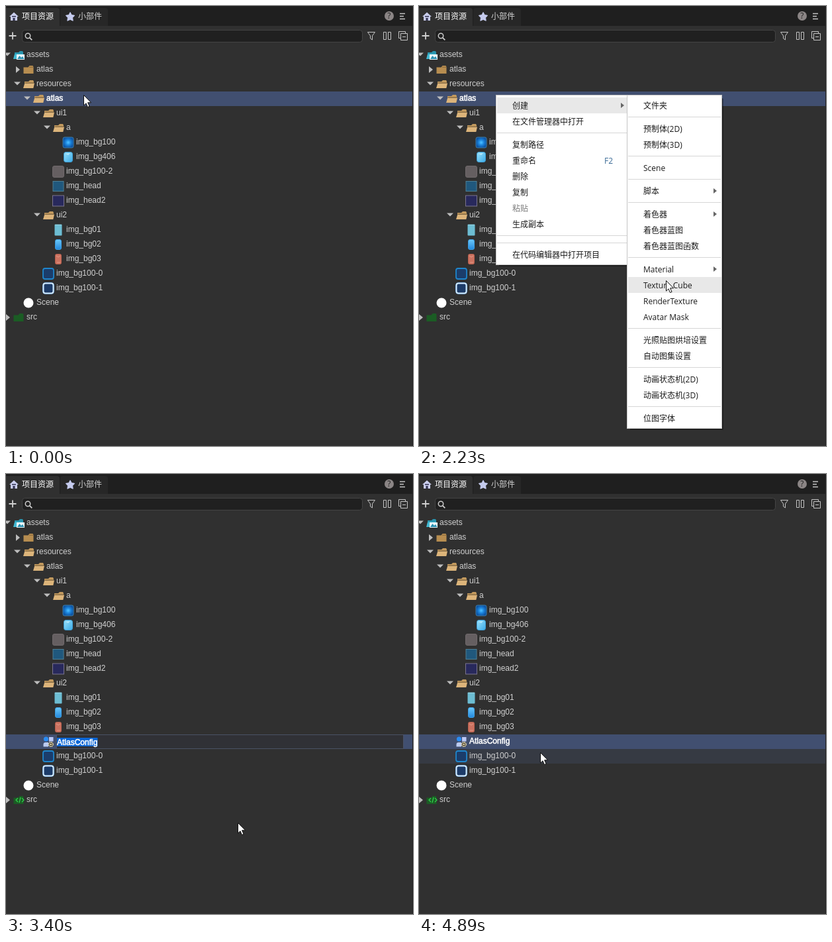
These frames come from a looping animation (615 by 664 pixels, 5.12 s). An HTML page:

```html
<!DOCTYPE html>
<html lang="zh-CN">
<head>
<meta charset="utf-8">
<title>Asset panel</title>
<style>
html, body { margin: 0; width: 100%; height: 100%; overflow: hidden; background: #303030; }
svg { display: block; width: 100%; height: 100%; }
text { font: 12px "Open Sans", "Noto Sans CJK SC", "Noto Sans CJK", sans-serif; white-space: pre; }
.tree text { font-family: "Liberation Sans", Arial, sans-serif; fill: #d0d0d0; }
.tree .on { fill: #fff; stroke: #fff; stroke-width: .55px; }
</style>
</head>
<body>
<svg id="stage" viewBox="0 0 615 664" xmlns="http://www.w3.org/2000/svg"></svg>
<script>
const LOOP = 5120, TOP = 63, ROW = 22, NEW_ROW = 15;

const rect = (x, y, w, h, fill, more = '') =>
  `<rect x="${x}" y="${y}" width="${w}" height="${h}" fill="${fill}" ${more}/>`;
const path = (d, fill, more = '') => `<path d="${d}" fill="${fill}" ${more}/>`;
const line = (d, color, w = 1) => path(d, 'none', `stroke="${color}" stroke-width="${w}"`);
const circle = (x, y, r, fill, more = '') => `<circle cx="${x}" cy="${y}" r="${r}" fill="${fill}" ${more}/>`;
const text = (x, y, s, fill, more = '') => `<text x="${x}" y="${y}" fill="${fill}" ${more}>${s}</text>`;
const group = (id, body, more = '') => `<g id="${id}" ${more}>${body}</g>`;
const tile = (w, h, fill, stroke, rx = 0, sw = 1) =>
  rect(-w / 2, -h / 2, w, h, fill, `rx="${rx}" stroke="${stroke}" stroke-width="${sw}"`);

// Icons are drawn around 0,0
const closed = color => path('M-7.5 6V-3.5h7l2-2.5h5l1 2V6z', color);
const icons = {
  open: path('M-6-1V-4H0l2-2h5l1 2v3z', '#c39a5e') + path('M-8 6l2.3-7.5H9L7.3 6z', '#dcb47a') +
    line('M-5.5-1.8H8', '#503f28', .8),
  closed: closed('#b78d50') + line('M1-3.7h6', '#7d5f35', .8),
  assets: path('M-6-1V-4H0l2-2h4l1 2v3z', '#2894ae') + path('M-8 6l2-7.5H7V6z', '#43b9d2') +
    rect(-3, -1, 12, 8, '#e9f7fb') + path('M-2 6l3.5-5L4 4l2-2 2.5 4z', '#2a8fb0'),
  glow: tile(16, 16, 'url(#glow)', '#3d7ca8', 2.5),
  sky: tile(13, 15, 'url(#sky)', '#3d9fd6', 3) + path('M-4-5l7-1-3 3z', '#c8f0ff', 'opacity=".8"'),
  gray: tile(17, 17, '#655f61', '#706a6c', 2.5),
  head: tile(16, 15, '#20587d', '#4e7f94'),
  head2: tile(17, 16, '#28295c', '#7a748e'),
  bg01: rect(-5.5, -8.5, 11, 17, '#6dbdd3', 'rx="1"') + line('M-5-7.5H5', '#95d2e0'),
  bg02: tile(9, 15, 'url(#sky2)', '#3e9fe2', 2.5),
  bg03: tile(9, 15, '#cb7260', '#b9614f', 2) + line('M-3-5l3 2 3-2M-2 5H3', '#e29a88'),
  frame0: tile(16, 16, '#1b3d6b', '#1f86cc', 3, 1.8),
  frame1: tile(17, 17, 'none', '#3f83cc', 4, 1) + tile(15, 15, '#1c3b68', '#d4ecff', 3, 2),
  scene: circle(0, 0, 7.5, '#fff'),
  src: closed('#1b5c24'),
  config: circle(-3.5, -4, 3.6, '#2a8cf2') + rect(1, -7, 6.5, 6.5, '#bcc8f4') +
    path('M-7.5 7.5V4q0-3 3.5-3h4v6.5z', '#bccbf0') +
    circle(3.8, 4, 3.2, '#3a3632', 'stroke="#e8d9a8" stroke-width="1.8" stroke-dasharray="1.7 .8"') +
    circle(3.8, 4, 1.3, '#f3e3ae')
};

// [depth, icon, name, arrow: 1 open, 2 collapsed]
const rows = [
  [0, 'assets', 'assets', 1], [1, 'closed', 'atlas', 2], [1, 'open', 'resources', 1],
  [2, 'open', 'atlas', 1], [3, 'open', 'ui1', 1], [4, 'open', 'a', 1],
  [5, 'glow', 'img_bg100'], [5, 'sky', 'img_bg406'], [4, 'gray', 'img_bg100-2'],
  [4, 'head', 'img_head'], [4, 'head2', 'img_head2'], [3, 'open', 'ui2', 1],
  [4, 'bg01', 'img_bg01'], [4, 'bg02', 'img_bg02'], [4, 'bg03', 'img_bg03'],
  [3, 'frame0', 'img_bg100-0'], [3, 'frame1', 'img_bg100-1'],
  [1, 'scene', 'Scene'], [0, 'src', 'src', 2]
];

function treeRow([depth, icon, name, arrow], i, id = '') {
  const x = 15 * depth, y = TOP + ROW * i;
  const d = arrow === 1 ? `M${x - 3} ${y + 7.5}h10l-5 5z` : `M${x} ${y + 6}v10l6-5z`;
  return (arrow ? path(d, '#bdbdbd') : '') +
    `<g transform="translate(${x + 19} ${y + 11})">${icons[icon]}</g>` +
    text(x + 31, y + 14, name, '', id && `id="${id}"`);
}

// Menu items: '-' separator, '>' suffix submenu, '|' shortcut, '~' disabled
const mainItems = ['创建>', '在文件管理器中打开', '-', '复制路径', '重命名|F2', '删除', '复制',
  '~粘贴', '生成副本', '-', '-', '在代码编辑器中打开项目'];
const subItems = ['文件夹', '-', '预制体(2D)', '预制体(3D)', '-', 'Scene', '-', '脚本>', '-',
  '着色器>', '着色器蓝图', '着色器蓝图函数', '-', 'Material>', 'Texture Cube', 'RenderTexture',
  'Avatar Mask', '-', '光照贴图烘培设置', '自动图集设置', '-', '动画状态机(2D)', '动画状态机(3D)', '-', '位图字体'];

function menu(id, x, w, items) {
  let y = 138, body = '';
  const spans = [];
  for (const item of items) {
    if (item === '-') {
      body += rect(x + 2, y + 5, w - 4, 1, '#d6d6d6');
      y += 11;
      continue;
    }
    const [label, key] = item.replace(/[~>]/g, '').split('|');
    body += text(x + 25, y + 16.5, label, item[0] === '~' ? '#7b7b7b' : '#1c1c1c');
    if (key) body += text(x + 164, y + 16.5, key, '#3b6b96');
    if (item.endsWith('>')) body += path(`M${x + w - 13} ${y + 8}v8l5-4z`, '#666');
    spans.push(y);
    y += 24;
  }
  const h = y + 4 - 134;
  const shade = rect(x + 5, 140, w - 3, h - 4, '#000', 'opacity=".25"') +
    rect(x + 5, 139, w - 4, h - 4, '#000', 'opacity=".4"');
  const svg = group(id, shade + rect(x + .5, 134.5, w - 1, h - 1, '#fff', 'stroke="#c4c4c4"') +
    rect(x + 2, 0, w - 3, 24, '#e8e8e8', `id="${id}Hot"`) + body, 'display="none"');
  return { svg, spans };
}

const main = menu('main', 116, 202, mainItems);
const sub = menu('sub', 314, 144, subItems);

const header =
  rect(0, 0, 615, 30, '#1f1f1f') + path('M0 30V3h77q4 0 4 4v23z', '#303030') +
  path('M82 30V7q0-4 4-4h64q4 0 4 4v23z', '#272727') +
  path('M5 16l7-6.5 7 6.5h-2v6H7v-6z', '#c9cdec') + rect(9, 15, 6, 1.5, '#303050') + rect(10.5, 18, 3, 4, '#303050') +
  text(24, 20, '项目资源', '#fff') +
  path('M97 9.5l2.2 4 4.5.8-3.1 3.4.6 4.6-4.2-1.9-4.2 1.9.6-4.6-3.1-3.4 4.5-.8z', '#c5cbee', 'stroke="#c5cbee" stroke-linejoin="round"') +
  text(109, 20, '小部件', '#d0d0d0') +
  circle(579, 15, 7, '#8b8585') + text(576.2, 19.3, '?', '#222', 'font-weight="700"') +
  line('M595 11.5h8M595 15.5h6M595 19.5h8', '#c4c4c4', 1.4) +
  line('M4.5 45h11M10 39.5v11', '#d0d0d0', 1.8) +
  rect(24.5, 36.5, 514, 18, '#202020', 'rx="4" stroke="#444"') +
  circle(33, 45, 3.7, 'none', 'stroke="#ccc" stroke-width="1.5"') + line('M35.7 47.8l3.6 3.6', '#ccc', 1.8) +
  line('M546.5 39.5h11l-4 5.5v6l-3-2v-4z', '#c4c4c4') +
  line('M570.5 39.5h4v11h-4zM577.5 39.5h4v11h-4z', '#c4c4c4') +
  line('M596.5 48.5h-3v-10h10v3M596.5 41.5h10v10h-10zM599 46.5h5', '#c4c4c4');

const editor =
  rect(76.5, 393.5, 524, 21, '#303136', 'stroke="#4a5265"') +
  rect(77, 398, 61.5, 13, '#0b66d6') + text(77, 409, 'AtlasConfig', '', 'class="on"');

document.getElementById('stage').innerHTML =
  `<defs>
    <radialGradient id="glow"><stop offset=".1" stop-color="#45b8ff"/><stop offset=".5" stop-color="#1b84dc"/><stop offset="1" stop-color="#0d54a4"/></radialGradient>
    <linearGradient id="sky" x2="1" y2="1"><stop stop-color="#9be2fb"/><stop offset="1" stop-color="#3cabe8"/></linearGradient>
    <linearGradient id="sky2" x2="0" y2="1"><stop stop-color="#6cc9fa"/><stop offset="1" stop-color="#2388dd"/></linearGradient>
  </defs>` +
  rect(0, 0, 615, 664, '#303030') + header +
  rect(0, 0, 614, ROW, '#363a43', 'id="hover"') + rect(0, 0, 614, ROW, '#414f70', 'id="picked"') +
  group('tree',
    rows.slice(0, NEW_ROW).map((r, i) => treeRow(r, i, i === 3 ? 'atlas' : '')).join('') +
    group('config', treeRow([3, 'config', 'AtlasConfig'], NEW_ROW, 'configName')) +
    group('lower', rows.slice(NEW_ROW).map((r, i) => treeRow(r, i + NEW_ROW)).join('') +
      group('code', line('M18 467l-3 3 3 3M24 467l3 3-3 3M22 466l-2 8', '#2fd04a', 1.3))) +
    group('editor', editor), 'class="tree"') +
  rect(614, 0, 1, 664, '#1f1f1f') +
  group('ghost', rect(458, 140, 2, 499, '#1b1b1b') + rect(320, 637, 140, 2, '#1b1b1b')) +
  main.svg + sub.svg +
  group('pointer', circle(-.5, 0, 12, '#fffa00', 'id="press" opacity=".5"') +
    path('M.5.5v15.6l3.5-3.3 2.5 5.7 2.6-1.1-2.5-5.6h5z', '#fff', 'stroke="#111" stroke-linejoin="round"'));

// Pointer keys, each held until the next: [ms, x, y, pressed]
const keys = [
  [0, 117, 134], [670, 117, 134, 1], [750, 117, 134],
  [1300, 130, 138], [1380, 150, 144], [1450, 162, 147],
  [1840, 190, 150], [1920, 248, 153], [2000, 312, 168], [2080, 352, 228], [2160, 367, 312],
  [2230, 373, 414], [2330, 375, 452], [2400, 376, 488], [2480, 376, 512], [2560, 376, 522],
  [2790, 376, 522, 1], [2870, 376, 522],
  [3400, 350, 526], [3500, 332, 550], [3580, 329, 555, 1], [3660, 329, 555],
  [3730, 295, 525], [3810, 240, 478], [3880, 208, 447],
  [3960, 196, 430], [4040, 189, 418], [4120, 185, 410], [4200, 183, 406], [4280, 182, 404],
  [4350, 182, 404, 1], [4430, 182, 404],
  [4580, 182, 406], [4660, 182, 410], [4740, 183, 414], [4810, 183, 418], [4890, 183, 420]
];

const $ = id => document.getElementById(id);
const show = (id, on) => $(id).setAttribute('display', on ? 'inline' : 'none');
const move = (id, y) => { show(id, y != null); if (y != null) $(id).setAttribute('y', y); };
const rowY = i => i < 0 ? null : TOP + ROW * i;

function draw(t) {
  const [, x, y, pressed] = keys.findLast(k => k[0] <= t);
  const menuOpen = t >= 750 && t < 2870, subOpen = t >= 1770 && t < 2870;
  const added = t >= 2940, editing = added && t < 3660;
  const picked = !added ? 3 : editing || t >= 4430 ? NEW_ROW : -1;
  const at = Math.floor((y - TOP) / ROW);
  const hover = !menuOpen && at < rows.length + added && at !== picked ? at : -1;

  show('main', menuOpen);
  show('sub', subOpen);
  show('ghost', t >= 1680 && t < 1770);
  move('mainHot', t >= 1300 ? main.spans[0] : null);
  move('subHot', x > 315 ? sub.spans.find(s => y >= s && y < s + 24) : null);
  move('picked', rowY(picked));
  move('hover', rowY(hover));

  show('config', added);
  show('configName', !editing);
  show('editor', editing);
  show('code', added);
  $('lower').setAttribute('transform', `translate(0 ${added ? ROW : 0})`);
  $('atlas').setAttribute('class', picked === 3 ? 'on' : '');
  $('configName').setAttribute('class', picked === NEW_ROW ? 'on' : '');

  $('pointer').setAttribute('transform', `translate(${x} ${y})`);
  show('press', pressed);
}

const start = performance.now();
function tick() {
  draw((performance.now() - start) % LOOP);
  requestAnimationFrame(tick);
}
tick();
</script>
</body>
</html>
```
